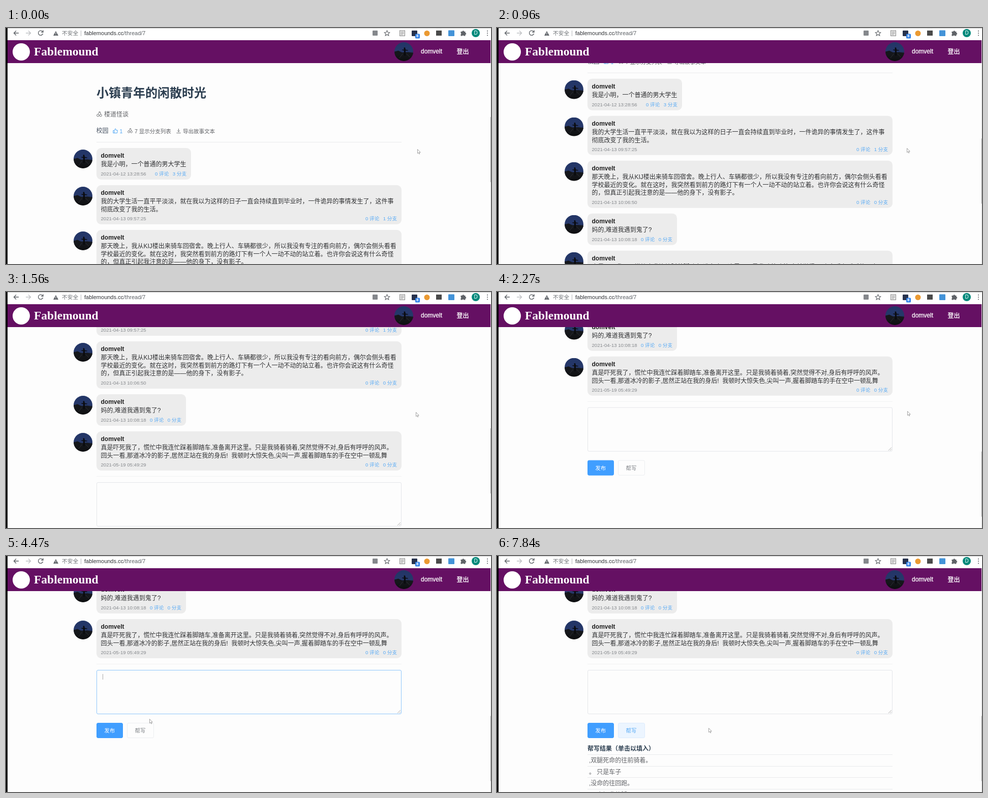
An HTML page that plays this animation: 954 px wide and 464 px high, repeating every 8000 ms.

```html
<!DOCTYPE html>
<html lang="zh-CN">
<head>
<meta charset="utf-8">
<title>Thread</title>
<style>
@property --y { syntax: "<number>"; inherits: true; initial-value: 0; }
html, body { margin: 0; width: 100%; height: 100%; overflow: hidden; }
body {
  position: relative; background: #fdfdfd; color: #303133;
  font: 12px/16px "Liberation Sans", "Noto Sans CJK SC", "Noto Sans CJK", sans-serif;
  white-space: nowrap;
  animation: scroll 8s infinite;
}
svg, .t, .bubble, .line, .box { position: absolute; }
svg { overflow: visible; }
b { font-weight: 700; }

/* page */
#page { position: absolute; inset: 0; transform: translateY(calc(var(--y) * -1px)); }
#track { position: absolute; left: 953px; top: 24px; width: 1px; height: 440px; background: #dedede; }
#thumb {
  position: absolute; left: 953px; top: 175px; width: 1px; height: 128px;
  background: #8f8f8f; transform: translateY(calc(var(--y) * .31px));
}
.line { left: 178px; width: 600px; height: 1px; background: #e9eaec; }
.s { font-size: 10.5px; color: #606266; }
.g { color: #606266; }
.blue { color: #55a9f5; }
.bubble {
  left: 178px; width: 600px; box-sizing: border-box; padding: 7.5px 9px 4px 8.5px;
  border-radius: 9px; background: #ececec; line-height: 15.5px;
}
.bubble b { display: block; color: #222; }
.bubble p { margin: 2.25px 0 1.75px; }
.bubble svg { left: -45px; top: 2.5px; }
.meta { display: flex; gap: 7.5px; font-size: 9.6px; line-height: 15px; color: #85888c; }
.meta i { font-style: normal; color: #55a9f5; }
.meta span { flex: 1; }

/* form */
.box { box-sizing: border-box; border: 1px solid #e4e6ea; border-radius: 3px; }
.btn { top: 777.5px; height: 30px; line-height: 28px; font-size: 10.5px; text-align: center; }
#area { left: 177.5px; top: 674px; width: 600.5px; height: 87px; animation: focus 8s step-end infinite; }
#caret { position: absolute; left: 11px; top: 7px; width: 1px; height: 11px; background: #aaa; animation: caret 8s step-end infinite; }
#send { left: 177.5px; width: 52.5px; background: #409eff; border-color: #409eff; color: #fff; }
#help { left: 237.5px; width: 53px; color: #7d8085; animation: help 8s step-end infinite; }
#mask { position: absolute; inset: -1px; background: rgba(255,255,255,.92); animation: load 8s step-end infinite; }
#spin { left: 10.5px; top: -.7px; width: 31.5px; height: 31.5px; animation: turn 2s -1.09s linear infinite; }
#spin circle { fill: none; stroke: #409eff; stroke-width: 2; stroke-linecap: round; animation: dash 8s ease-in-out infinite; }
#results { animation: results 8s step-end infinite; }

/* fixed parts */
#top { position: absolute; left: 0; top: 0; width: 954px; height: 24px; background: #fff; border-top: 1px solid #c9c9c9; box-sizing: border-box; }
#bar { position: absolute; left: 3px; top: 24px; width: 950px; height: 45px; background: #651063; }
#edge { position: absolute; left: 0; top: 0; width: 3px; height: 464px; background: #000; }
#brand { left: 52px; top: 10px; font: 700 23.5px/24px "Liberation Serif", serif; }
#bar .t { color: #fff; }
#bar .nav { -webkit-text-stroke: .3px #fff; }

#mouse { position: absolute; left: 0; top: 0; animation: mouse 8s linear infinite; }
#mouse svg { left: 0; top: 0; width: 8px; height: 11px; }
#arrow { animation: arrow 8s step-end infinite; }
#beam { animation: beam 8s step-end infinite; }

@keyframes scroll {
  0% { --y: 0; animation-timing-function: linear; }
  4.375% { --y: 0; animation-timing-function: cubic-bezier(.1,.75,.2,1); }
  7.625% { --y: 75; }
  11.125% { --y: 75; animation-timing-function: cubic-bezier(.1,.75,.2,1); }
  14.375% { --y: 150; animation-timing-function: cubic-bezier(.1,.75,.2,1); }
  16.875% { --y: 225; animation-timing-function: cubic-bezier(.1,.75,.2,1); }
  19.5% { --y: 300; }
  22% { --y: 300; animation-timing-function: cubic-bezier(.1,.75,.2,1); }
  25.25% { --y: 375; }
  26.5% { --y: 375; animation-timing-function: cubic-bezier(.1,.75,.2,1); }
  29.75%, 100% { --y: 450; }
}
@keyframes mouse {
  0%, 4.375% { transform: translate(809px, 238px); }
  8.375%, 21% { transform: translate(806px, 236px); }
  23%, 30% { transform: translate(807px, 234px); }
  36.5% { transform: translate(511px, 262px); }
  40.25%, 42.5% { transform: translate(345px, 262px); }
  45.5%, 50% { transform: translate(286px, 267px); }
  55.875% { transform: translate(282px, 320px); }
  57.375% { transform: translate(279px, 329px); }
  61%, 63% { transform: translate(266px, 342px); }
  68%, 79% { transform: translate(461px, 343px); }
  95%, 100% { transform: translate(416px, 338px); }
}
@keyframes arrow { 0%, 54.8% { opacity: 1; } 30.7% { opacity: 0; } }
@keyframes beam { 0%, 54.8% { opacity: 0; } 30.7% { opacity: 1; } }
@keyframes focus { 0%, 61.375% { border-color: #e4e6ea; } 47.75% { border-color: #8fc6fb; } }
@keyframes caret { 0%, 57.375% { opacity: 0; } 47.75% { opacity: 1; } }
@keyframes help {
  0% { background: #fdfdfd; border-color: #eceef1; color: #7d8085; }
  59.5%, 100% { background: #ecf5ff; border-color: #dcecfd; color: #55a9f5; }
}
@keyframes load { 0%, 89.875% { visibility: hidden; } 61.375% { visibility: visible; } }
@keyframes results { 0% { visibility: hidden; } 89.875%, 100% { visibility: visible; } }
@keyframes turn { to { transform: rotate(360deg); } }
@keyframes dash {
  0%, 61.375% { stroke-dasharray: 1 200; stroke-dashoffset: 0; }
  70.75% { stroke-dasharray: 90 150; stroke-dashoffset: -40; }
  80.125% { stroke-dasharray: 90 150; stroke-dashoffset: -120; }
  80.126% { stroke-dasharray: 1 200; stroke-dashoffset: 0; }
  89.5%, 100% { stroke-dasharray: 90 150; stroke-dashoffset: -40; }
}
</style>
</head>
<body>
<svg width="0" height="0">
  <defs>
    <linearGradient id="sky" x2="0" y2="1">
      <stop offset="0" stop-color="#223566"/><stop offset=".5" stop-color="#26386a"/>
      <stop offset=".6" stop-color="#16181c"/><stop offset="1" stop-color="#0d0e10"/>
    </linearGradient>
    <symbol id="face" viewBox="0 0 38 38">
      <circle cx="19" cy="19" r="19" fill="url(#sky)"/>
      <path d="M0 19 8 17 16 21 28 20 38 22 36 27 2 27Z" fill="#15171b"/>
      <path d="M19 12a1.500 1.500 0 1 1 3 0l.5 3 5 1v1l-5 0 .5 10h-4l.5-10-4-1v-1l4 0Z" fill="#0a0b0e"/>
      <path d="M10 32 17 23M24 23 31 30" stroke="#34363a" stroke-width=".8"/>
    </symbol>
    <symbol id="cherry" viewBox="0 0 11 11">
      <g fill="none" stroke="#606266" stroke-width=".9">
        <circle cx="2.8" cy="7.8" r="2.2"/><circle cx="8.2" cy="7.8" r="2.2"/>
        <path d="M3 5.6Q4 3 7 .8Q8 3 8.2 5.6M4 1.4 7 .8"/>
      </g>
    </symbol>
  </defs>
</svg>

<div id="page">
  <b class="t" style="left:178px;top:112px;font-size:24px;line-height:32px;color:#2c3e50">小镇青年的闲散时光</b>
  <svg style="left:178px;top:164px" width="11" height="11"><use href="#cherry"/></svg>
  <span class="t g" style="left:193px;top:162px">楼道怪谈</span>
  <span class="t" style="left:177.5px;top:194px;color:#4a5565">校园</span>
  <svg style="left:210px;top:197px" width="10" height="10" fill="none" stroke="#55a9f5"><path d="M.8 4.5H3V9.5H.8ZM3 4.5 5 .8Q6.6 1 6 4H9.4L8.6 9.5H3"/></svg>
  <span class="t s blue" style="left:223.5px;top:194.5px">1</span>
  <svg style="left:239px;top:197px" width="10" height="10"><use href="#cherry"/></svg>
  <span class="t s" style="left:253px;top:194.5px">7 显示分支列表</span>
  <svg style="left:335px;top:198px" width="9" height="9" fill="none" stroke="#606266" stroke-width=".9"><path d="M4.5 0V6M2 3.6 4.5 6 7 3.6M.3 8.4H8.7"/></svg>
  <span class="t s" style="left:348px;top:194.5px">导出故事文本</span>
  <div class="line" style="top:224px"></div>

  <div class="bubble" style="top:236px;width:186px">
    <svg width="37" height="37"><use href="#face"/></svg>
    <b>domvelt</b><p>我是小明，一个普通的男大学生</p>
    <div class="meta"><span>2021-04-12 13:28:56</span><i>0 评论</i><i>3 分支</i></div>
  </div>
  <div class="bubble" style="top:309px">
    <svg width="37" height="37"><use href="#face"/></svg>
    <b>domvelt</b><p>我的大学生活一直平平淡淡，就在我以为这样的日子一直会持续直到毕业时，一件诡异的事情发生了，这件事<br>彻底改变了我的生活。</p>
    <div class="meta"><span>2021-04-13 09:57:25</span><i>0 评论</i><i>1 分支</i></div>
  </div>
  <div class="bubble" style="top:397px">
    <svg width="37" height="37"><use href="#face"/></svg>
    <b>domvelt</b><p>那天晚上，我从KIJ楼出来骑车回宿舍。晚上行人、车辆都很少，所以我没有专注的看向前方，偶尔会侧头看看<br>学校最近的变化。就在这时，我突然看到前方的路灯下有一个人一动不动的站立着。也许你会说这有什么奇怪<br>的，但真正引起我注意的是——他的身下，没有影子。</p>
    <div class="meta"><span>2021-04-13 10:06:50</span><i>0 评论</i><i>0 分支</i></div>
  </div>
  <div class="bubble" style="top:501px;width:176px">
    <svg width="37" height="37"><use href="#face"/></svg>
    <b>domvelt</b><p>妈的,难道我遇到鬼了?</p>
    <div class="meta"><span>2021-04-13 10:08:18</span><i>0 评论</i><i>0 分支</i></div>
  </div>
  <div class="bubble" style="top:574px">
    <svg width="37" height="37"><use href="#face"/></svg>
    <b>domvelt</b><p>真是吓死我了，慌忙中我连忙踩着脚踏车,准备离开这里。只是我骑着骑着,突然觉得不对,身后有呼呼的风声。<br>回头一看,那道冰冷的影子,居然正站在我的身后!&nbsp; 我顿时大惊失色,尖叫一声,握着脚踏车的手在空中一顿乱舞</p>
    <div class="meta"><span>2021-05-19 05:49:29</span><i>0 评论</i><i>0 分支</i></div>
  </div>

  <div class="line" style="top:662px;background:#f1f2f3"></div>
  <div class="box" id="area">
    <div id="caret"></div>
    <svg style="right:1px;bottom:1px" width="6" height="6" stroke="#9a9a9a" stroke-width=".8"><path d="M0 6 6 0M3.5 6 6 3.5"/></svg>
  </div>
  <div class="box btn" id="send">发布</div>
  <div class="box btn" id="help">帮写
    <div id="mask"><svg id="spin" viewBox="0 0 50 50"><circle cx="25" cy="25" r="20"/></svg></div>
  </div>
  <div id="results">
    <b class="t" style="left:178px;top:821px;color:#2c3e50">帮写结果（单击以填入）</b>
    <div class="line" style="top:840px"></div>
    <span class="t g" style="left:181px;top:844px">,双腿死命的往前骑着。</span>
    <div class="line" style="top:862.5px"></div>
    <span class="t g" style="left:181px;top:866.5px">。 只是车子</span>
    <div class="line" style="top:885px"></div>
    <span class="t g" style="left:181px;top:889px">,没命的往回跑。</span>
    <div class="line" style="top:907.5px"></div>
    <span class="t g" style="left:181px;top:911.5px">。 大概我的腿</span>
  </div>
</div>

<div id="track"></div>
<div id="thumb"></div>

<div id="top"></div>
<svg style="left:0;top:0" width="954" height="24" fill="none" stroke="#5f6368" stroke-width="1.4">
  <path d="M25 10H15.5M20 5.5 15.5 10 20 14.5"/>
  <path d="M39 10H48.5M44 5.5 48.5 10 44 14.5" stroke="#c0c2c5"/>
  <path d="M72 7.2A4.6 4.6 0 1 0 72.6 11M73 4.5V8.3H69.2"/>
  <path d="M98 6 103 15H93Z" fill="#5f6368" stroke="none"/>
  <path d="M98 9V12M98 13V14" stroke="#fff" stroke-width="1"/>
  <path d="M147.5 5V16" stroke="#b5b7ba" stroke-width="1"/>
  <rect x="721" y="5" width="10" height="10" rx="1" fill="#85888c" stroke="none"/>
  <path d="M749.5 5 751 8.6 754.7 8.9 751.9 11.4 752.8 15 749.5 13 746.2 15 747.1 11.4 744.3 8.9 748 8.6Z" stroke-width="1.1"/>
  <rect x="774.5" y="5" width="10" height="10.5" fill="#e6e6e6" stroke="#8b8b8b" stroke-width="1"/>
  <path d="M776.5 8H782.5M776.5 10.5H782.5M776.5 13H780.5" stroke="#999" stroke-width="1"/>
  <rect x="798" y="5" width="11" height="11" rx="1" fill="#27324d" stroke="none"/>
  <rect x="805" y="11.5" width="9" height="9" rx="1.5" fill="#2f80e8" stroke="none"/>
  <circle cx="828" cy="10.5" r="5.5" fill="#eb9a32" stroke="none"/>
  <rect x="846" y="5" width="11" height="10" fill="#4a4a4a" stroke="none"/>
  <rect x="870" y="4.5" width="12" height="11.5" rx="1" fill="#4393d8" stroke="none"/>
  <path d="M894.5 7H897.5A1.7 1.7 0 1 1 901 7H903.5V9.5A1.7 1.7 0 1 1 903.5 13V15.5H900.5A1.6 1.6 0 0 0 897.5 15.5H894.5V12.5A1.6 1.6 0 0 0 894.5 9.7Z" fill="#5f6368" stroke="none"/>
  <circle cx="924" cy="10" r="8" fill="#00897b" stroke="none"/>
  <path d="M947 5V6.8M947 9.2V11M947 13.4V15.2" stroke-width="1.8"/>
</svg>
<span class="t" style="left:110px;top:2px;font-size:10.7px;color:#6c7074">不安全</span>
<span class="t" style="left:154px;top:2px;font-size:11px;color:#303236">fablemounds.cc<span style="color:#5f6368">/thread/7</span></span>
<b class="t" style="left:807px;top:8px;font-size:8px;color:#fff">8</b>
<span class="t" style="left:920.5px;top:2px;font-size:10px;color:#fff">D</span>

<div id="bar">
  <svg style="left:10px;top:6px" width="34" height="34"><circle cx="17" cy="17" r="17" fill="#fff"/></svg>
  <span class="t" id="brand">Fablemound</span>
  <svg style="left:761px;top:4px" width="37" height="37"><use href="#face"/></svg>
  <span class="t nav" style="left:813px;top:14px">domvelt</span>
  <span class="t nav" style="left:883.5px;top:15px">登出</span>
</div>
<div id="edge"></div>

<div id="mouse">
  <svg id="arrow"><path d="M.5.5V8.6L2.4 7 3.7 9.8 4.9 9.3 3.7 6.5H6.2Z" fill="#fff" stroke="#8c8c8c" stroke-width=".8"/></svg>
  <svg id="beam"><path d="M-2-5H2M0-5V5M-2 5H2" stroke="#666" stroke-width=".9"/></svg>
</div>
</body>
</html>
```
